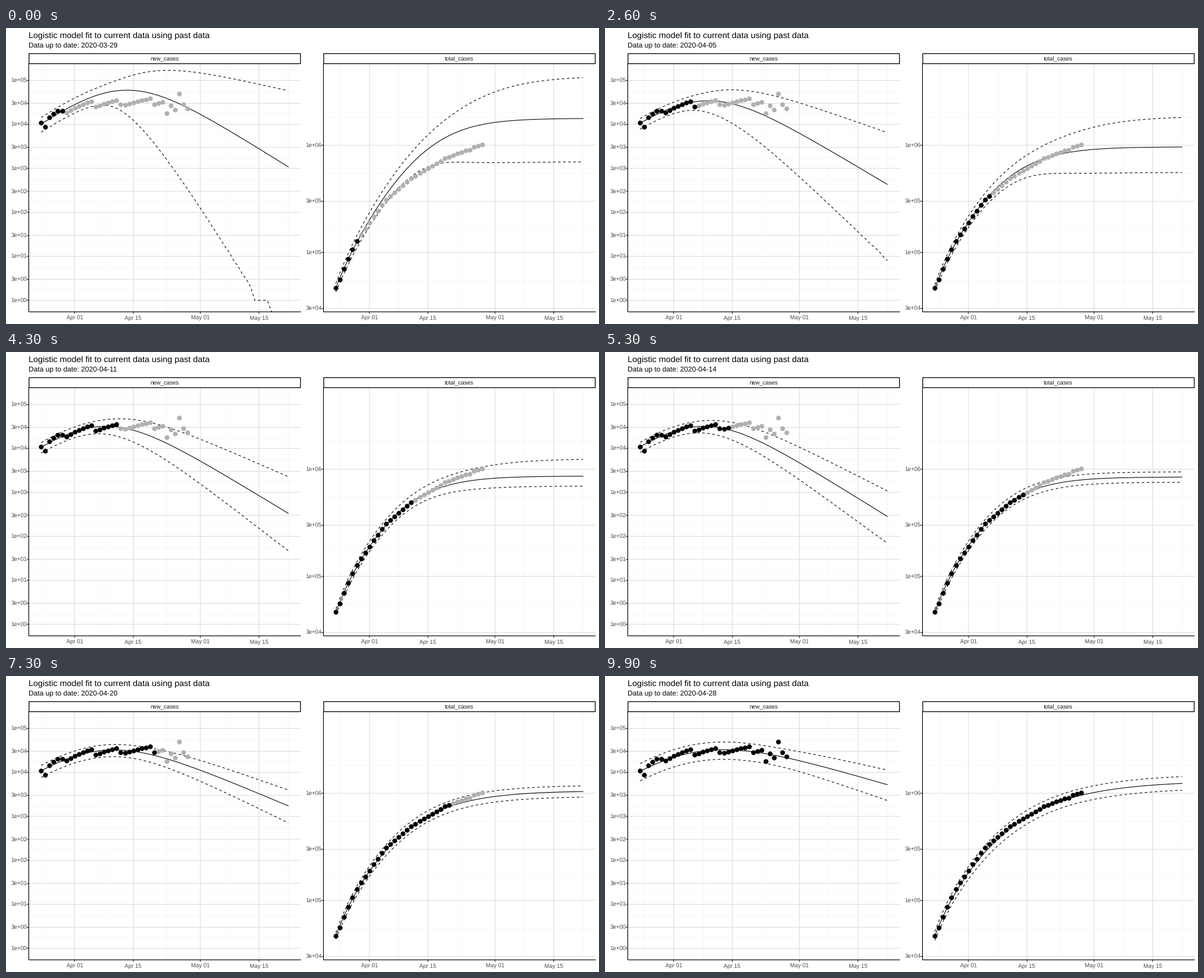
Recreate the animation shown at these times as a matplotlib script. Size 1000 by 500 pixels, loop 10000 ms.

```python
import numpy as np
import matplotlib.pyplot as plt
from matplotlib.animation import FuncAnimation
from matplotlib.patches import Rectangle

plt.rcParams["font.family"] = "Liberation Sans"
plt.rcParams["path.snap"] = False
plt.rcParams["text.hinting"] = "no_hinting"

W, H, PX = 1000, 500, 0.72        # PX: points per pixel at 100 dpi
FRAMES, STATES = 100, 31
TOP, BOTTOM = 60.5, 479.5
DAY_W = 7.064
DAYS = np.arange(60)              # day 0 is 24 March
LEFT_X, RIGHT_X = 38.4, 535.4     # left edges of the panels
PANEL_W = 458.4
START_TOTAL = 46600


def new_y(v):
    return 88.5 + 74.3 * (5 - np.log10(v))


def new_count(y):
    return 10 ** (5 - (y - 88.5) / 74.3)


def total_y(v):
    return 198 + 181 * (6 - np.log10(v))


def day_x(x0, day):
    return x0 + 20.84 + DAY_W * np.asarray(day)


def sigmoid(t, mid, width):
    return 1 / (1 + np.exp((mid - t) / width))


def softplus(t, start, width):
    return width * np.log1p(np.exp((t - start) / width))


# How the fit changes as data come in: values at a few states.
KEYS = [0, 4, 11, 16, 20, 30]
SHAPE = dict(
    peak=[105, 119.5, 125.5, 125.5, 125, 124.5],   # height of the maximum
    mode=[20.5, 17, 15.7, 15.2, 16.8, 20],         # day of the maximum
    fall=[.137, .131, .131, .1365, .1, .0645],     # final rate of decline
    band=[11, 8, 8, 7.5, 8, 13],                   # early band width
    fan=[17, 13, 13, 14, 20, 33],                  # day the band opens
    up=[2.8, 2.1, 1.45, .79, .5, .45],             # how fast it opens
    down=[6.9, 4.05, 1.42, .8, .5, .4])
RISE = 0.155


def daily_counts(y):
    """Round heights to whole counts; zero falls to the axis."""
    n = np.round(new_count(y))
    return np.where(n > 0, new_y(np.maximum(n, 1)), BOTTOM)


def curves(state):
    """Median, upper and lower heights for both panels."""
    p = {name: np.interp(state, KEYS, v) for name, v in SHAPE.items()}
    x, fall = DAYS - p["mode"], p["fall"]
    bell = (RISE * np.exp(fall * x / 2) + fall * np.exp(-RISE * x / 2))
    mid = p["peak"] + 148.6 * np.log10(bell / (RISE + fall))
    opening = softplus(DAYS, p["fan"], 2.5)
    new = [mid,
           mid - p["band"] - p["up"] * opening,
           mid + 1.25 * p["band"] + p["down"] * opening]

    growth = np.cumsum(np.r_[START_TOTAL, new_count(mid[1:])])
    # Wide fits pull the total above the sum of the daily medians.
    total = total_y(growth) - 1.1 * p["down"] * sigmoid(DAYS, 26, 5)
    edge = 5 + 4 * (1 - np.exp(-DAYS / 5)) + (p["band"] - 8) / 2
    above = 65 * np.tanh(max(p["up"] - .8, 0) / 1.2) * sigmoid(DAYS, 32, 8)
    below = 65 * np.tanh(max(p["down"] - .8, 0) / 3) * sigmoid(DAYS, 26, 5)
    return [daily_counts(y) for y in new] + [
        total, total - edge - above, total + edge + below]


# Observed counts: early growth, a weekly sawtooth and some odd days.
seen_days = np.arange(36)
seen_new = (122.5 + 39 * np.exp(-seen_days / 6)
            + 6 - 1.7 * ((seen_days - 6) % 7))
for day, shift in {0: -6, 1: 9, 5: 5, 19: 9, 30: 20, 31: 9, 32: 18,
                   33: -7, 35: 9}.items():
    seen_new[day] += shift
seen_total = total_y(np.cumsum(np.r_[START_TOTAL, new_count(seen_new[1:])]))

fig = plt.figure(figsize=(W / 100, H / 100), dpi=100, facecolor="white")
ax = fig.add_axes([0, 0, 1, 1])
ax.set(xlim=(0, W), ylim=(H, 0))
ax.axis("off")


def line(xs, ys, color, width, z, **kw):
    return ax.plot(xs, ys, color=color, lw=width * PX, zorder=z, **kw)[0]


def text(x, y, s, size, color="black", ha="left"):
    return ax.text(x, y, s, fontsize=size * PX, color=color, ha=ha,
                   va="baseline", zorder=6)


def minor(breaks):
    """Midpoints of the breaks, with one extra step on each side."""
    step = breaks[-1] - breaks[-2]
    b = np.r_[breaks[0] - step, breaks, breaks[-1] + step]
    return (b[1:] + b[:-1]) / 2


def panel(x0, name, scale, labels):
    x1 = x0 + PANEL_W
    xs = day_x(x0, [8, 22, 38, 52])
    ys = np.array([scale(float(s)) for s in labels])
    for color, width, z, gx, gy in (("#f1f1f1", 0.6, 0, minor(xs), minor(ys)),
                                    ("#dedede", 1.16, 1, xs, ys)):
        for x in gx:
            line([x, x], [TOP, BOTTOM], color, width, z)
        for y in gy:
            if TOP < y < BOTTOM:
                line([x0, x1], [y, y], color, width, z)
    for x, s in zip(xs, ("Apr 01", "Apr 15", "May 01", "May 15")):
        line([x, x], [BOTTOM, BOTTOM + 3], "#333333", 1.16, 4)
        text(x, 493, s, 9.6, "#4d4d4d", "center")
    for y, s in zip(ys, labels):
        line([x0 - 3, x0], [y, y], "#333333", 1.16, 4)
        text(x0 - 3.2, y + 3.5, s, 9.6, "#4d4d4d", "right")
    line([x0, x0, x1], [TOP, BOTTOM, BOTTOM], "black", 1.16, 4)
    ax.add_patch(Rectangle((x0 + 0.4, 43.3), PANEL_W - 0.6, 17, fc="white",
                           ec="black", lw=1.3 * PX, zorder=5))
    text((x0 + x1) / 2, 55.5, name, 9.6, "#1a1a1a", "center")


def dots(color, z):
    return ax.plot([], [], "o", color=color, ms=8 * PX, mew=0, zorder=z)[0]


panel(LEFT_X, "new_cases", new_y,
      [f"{m}e+0{e}" for e in range(5, -1, -1) for m in (3, 1)][1:])
panel(RIGHT_X, "total_cases", total_y, ["1e+06", "3e+05", "1e+05", "3e+04"])

text(38, 17, "Logistic model fit to current data using past data", 14.4)
subtitle = text(38, 34, "", 12)

lines = [line(day_x(x0, DAYS), 0 * DAYS, "black", 1.07, 2, ls=style)
         for x0 in (LEFT_X, RIGHT_X)
         for style in ("-", (0, (4, 4)), (0, (4, 4)))]
series = [(day_x(x0, seen_days), ys, dots("black", 3.5))
          for x0, ys in ((LEFT_X, seen_new), (RIGHT_X, seen_total))]
for xs, ys, _ in series:
    dots("#b0b0b0", 3).set_data(xs, ys)

starts = np.round(np.linspace(1, FRAMES, STATES)) - 1


def draw(i):
    state = int(np.searchsorted(starts, i, side="right")) - 1
    for curve, ys in zip(lines, curves(state)):
        curve.set_ydata(ys)
    for xs, ys, past in series:
        past.set_data(xs[:state + 6], ys[:state + 6])
    # The date label flips a little later than the data.
    day = 29 + int(i * (STATES - 1) / (FRAMES - 1) + 1e-9)
    month, day = (3, day) if day <= 31 else (4, day - 31)
    subtitle.set_text(f"Data up to date: 2020-{month:02d}-{day:02d}")
    return [*lines, *(s[2] for s in series), subtitle]


anim = FuncAnimation(fig, draw, frames=FRAMES, interval=100, blit=False,
                     repeat=True)
plt.show()
```
